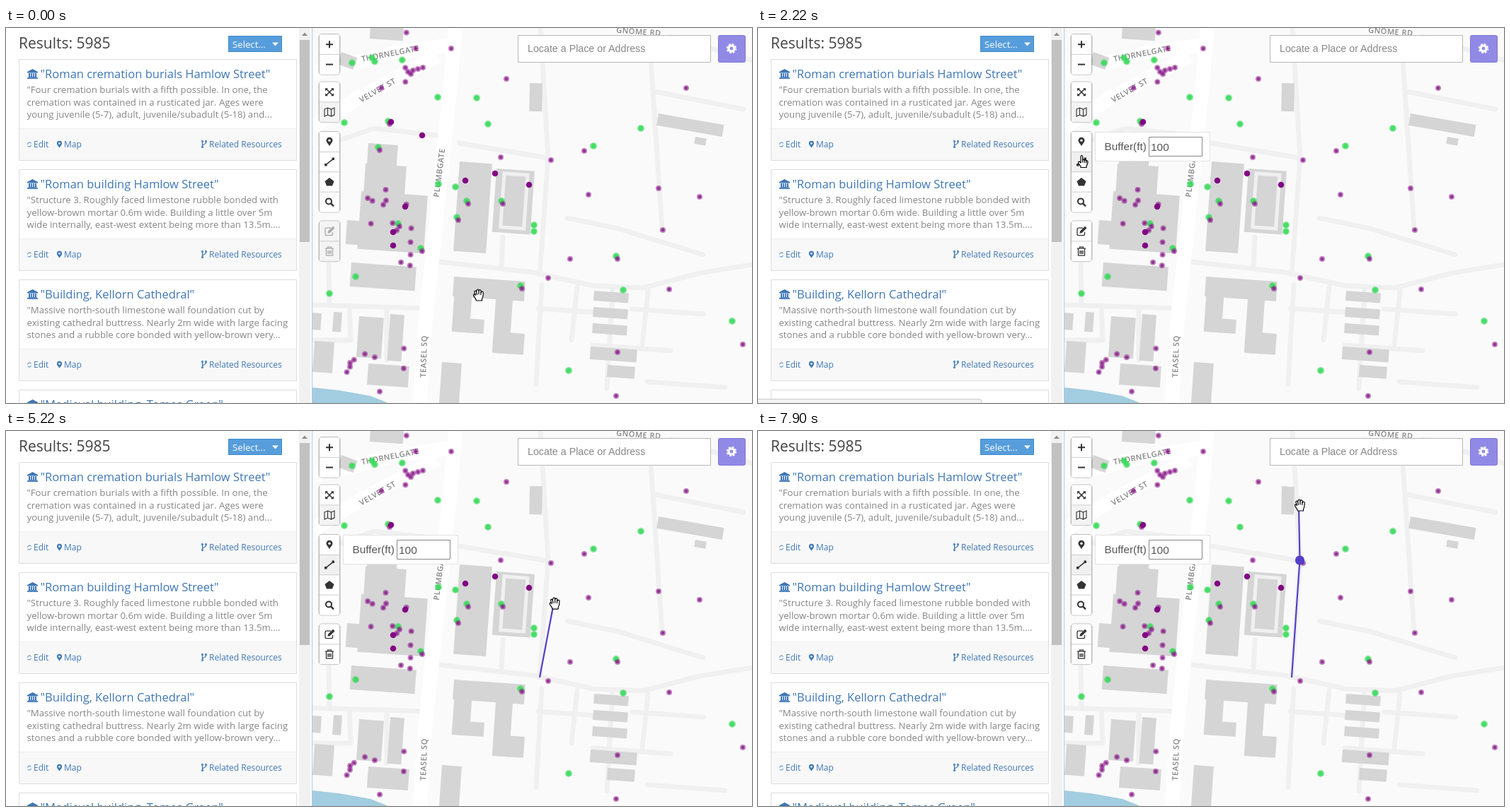
Write an HTML page that moves like this. It is 1054 px wide and 531 px high and loops after 8 s.

```html
<!DOCTYPE html>
<html lang="en">
<head>
<meta charset="utf-8">
<title>Map search</title>
<style>
html, body { margin: 0; width: 100%; height: 100%; overflow: hidden; background: #fff; }
svg { display: block; width: 1054px; height: 531px; font-family: "Open Sans", sans-serif; }
.arial { font-family: "Liberation Sans", Arial, sans-serif; }
.link { fill: #3f77b5; font-size: 12px; }
.title { fill: #3f77b5; font-size: 16.5px; }
.desc { fill: #858585; font-size: 13.2px; }
.street { fill: #858585; font-size: 11px; font-weight: 600; letter-spacing: .5px; text-anchor: middle;
  stroke: #fff; stroke-width: 2.5px; paint-order: stroke; }
.road { fill: none; stroke: #f0f0f0; stroke-width: 7; stroke-linejoin: round; stroke-linecap: round; }
.main { fill: none; stroke: #fff; stroke-width: 20; stroke-linejoin: round; }
.icon { fill: none; stroke: #333; stroke-width: 1.6; }
.solid { fill: #333; stroke: none; }
.hand { fill: #fff; stroke: #000; stroke-width: 1.2; stroke-linejoin: round; stroke-linecap: round; }
</style>
</head>
<body>
<svg viewBox="0 0 1054 531" xmlns="http://www.w3.org/2000/svg">
  <defs>
    <clipPath id="mapClip"><path d="M433 0H1054V531H433Z"/></clipPath>
    <g id="museum" fill="#3f77b5">
      <path d="M0 4 7.5 0 15 4V5.500H0ZM1.500 11H13.500V12H1.500ZM0 12.300H15V14H0Z"/>
      <path d="M2 6H4.200V11H2ZM5.200 6H7V11H5.200ZM8 6H9.800V11H8ZM10.800 6H13V11H10.800Z"/>
    </g>
    <path id="marker" fill-rule="evenodd" d="M0 6C-1 3-4.500 1-4.500-2A4.500 4.500 0 0 1 4.500-2C4.500 1 1 3 0 6ZM0-3.800A1.800 1.800 0 1 0 0-.2 1.800 1.800 0 1 0 0-3.800Z"/>
    <g id="fork" fill="none" stroke="#3f77b5" stroke-width="1.200">
      <path d="M1.500 2V9M6.500 2V3.500C6.500 6 1.500 5 1.500 8"/>
      <circle cx="1.500" cy="1.500" r="1"/><circle cx="6.500" cy="1.500" r="1"/><circle cx="1.500" cy="9.500" r="1"/>
    </g>
    <path id="refresh" fill="none" stroke="#3f77b5" d="M.5 1.500Q1-1 3-1T5.500.5M5.500 3Q5 5 3 5T.5 4"/>
  </defs>

  <g clip-path="url(#mapClip)">
    <path fill="#fafafa" d="M433 0H1054V531H433Z"/>
    <g id="land"></g>
    <g id="dots"></g>
    <g id="sketch" stroke="#5340c8" stroke-width="2.200" fill="none">
      <polyline id="route"/>
      <circle id="vertex" cx="765.500" cy="183" r="5.500" fill="#5340c8"/>
    </g>
  </g>
  <path stroke="#a9c9ee" d="M432.500 0V531"/>

  <g id="panel">
    <text x="18" y="29" font-size="21" fill="#444">Results: 5985</text>
    <path fill="#579ddb" stroke="#3c8bd0" d="M314.500 11.500H389.500V33.500H314.500Z"/>
    <text x="320" y="27.500" font-size="13.200" fill="#fff">Select...</text>
    <path fill="#fff" d="M376 20.500H385L380.500 25.500Z"/>
    <g id="cards"></g>
    <path fill="#f1f1f1" d="M414 0H430V531H414Z"/>
    <path fill="#c1c1c1" d="M415 17H429V303H415Z"/>
    <path fill="#8a8a8a" d="M418 11 422 6.500 426 11Z"/>
    <path id="status" fill="#f2f2f2" stroke="#c8c8c8" d="M-1 525.500H312Q316 525.500 316 529V533H-1Z"/>
  </g>

  <g id="tools"></g>

  <g id="buffer" class="arial" fill="#555">
    <path fill="#fff" stroke="#e3e3e3" d="M476.500 147.500H638.500V188.500H476.500Z"/>
    <text x="489.500" y="173" font-size="15.300">Buffer(ft)</text>
    <path fill="#fff" stroke="#888" d="M552.500 154.500H627.500V181.500H552.500Z"/>
    <text x="555" y="174" font-size="15.500">100</text>
  </g>

  <path fill="#fff" stroke="#b8b8b8" d="M723.500 10.500H995.500V48.500H723.500Z"/>
  <text class="arial" x="737" y="34" font-size="14.250" fill="#888">Locate a Place or Address</text>
  <rect x="1006.500" y="10.500" width="38" height="38" rx="2" fill="#9189e6" stroke="#8078d8"/>
  <g transform="translate(1025 29)" fill="none" stroke="#fff">
    <circle r="4" stroke-width="3.200"/>
    <circle r="6" stroke-width="2.400" stroke-dasharray="2.600 2.112"/>
  </g>

  <g id="cursor" class="hand">
    <g id="open">
      <path d="M-3.500 8C-4 5-6 4-7 1.500-8.500-1-6-2-4.500.5L-6-4C-6.500-6-4-6.500-3.400-4.500L-2.800-6.500C-2.600-8.500-.3-8.500 0-6.500L.3-6C.8-8 3-7.500 3.200-5.500L3.300-3.500C4-5.500 6.500-5 6.300-3 6 0 6.500 3 4.500 5.500V8Z"/>
      <path fill="none" d="M-3.400-4.500-2.500-.5M0-6.500V-1M3.200-4.500 2.800-.5"/>
    </g>
    <g id="closed">
      <path d="M-3.500 6C-4 4-6 3-6 1-6-1-5-1.500-4-1-4.500-4.500-2-5.500-1-4 0-5.500 2-5 2.500-3.800 4-4.800 6-3.500 5.800-1.500 6 1 5.500 2 4 4V6Z"/>
      <path fill="none" d="M-1-4V-2M2.500-3.800V-2M-4-1V1"/>
    </g>
    <g id="point">
      <path d="M-2.800 8.500C-3 5.500-6 4-6.500 1.500-6.500-.5-4.500-.5-3 2V-7C-3-9-.4-9-.4-7V-2C.3-3.500 2-3 2.200-1.500 3-2.800 4.600-2 4.700-.8 5.500-1.800 7-1 7 .5 7 3.500 6 5 5 6.500V8.500Z"/>
      <path fill="none" d="M-.4-2V1M2.200-1.500V1.500M4.700-.8V2"/>
    </g>
  </g>
</svg>

<script>
const $ = id => document.getElementById(id);
const fill = (id, html) => $(id).innerHTML = html;
const text = (cls, x, y, s) => `<text class="${cls}" x="${x}" y="${y}">${s}</text>`;
const repeat = (n, make) => Array.from({ length: n }, (_, i) => make(i));

// Result cards
const results = [
  ['Roman cremation burials Hamlow Street', '"Four cremation burials with a fifth possible. In one, the',
    'cremation was contained in a rusticated jar. Ages were', 'young juvenile (5-7), adult, juvenile/subadult (5-18) and...'],
  ['Roman building Hamlow Street', '"Structure 3. Roughly faced limestone rubble bonded with',
    'yellow-brown mortar 0.6m wide. Building a little over 5m', 'wide internally, east-west extent being more than 13.5m....'],
  ['Building, Kellorn Cathedral', '"Massive north-south limestone wall foundation cut by',
    'existing cathedral buttress. Nearly 2m wide with large facing', 'stones and a rubble core bonded with yellow-brown very...'],
  ['Medieval building, Tomes Green']
];
fill('cards', results.map(([title, ...lines], i) => `<g transform="translate(0 ${i * 156})">
  <path fill="#fff" stroke="#ddd" d="M18.500 44.500H410.500V187.500H18.500Z"/>
  <path fill="#f8f8f8" d="M19 142H410V187H19Z"/><path stroke="#eee" d="M19 142.500H410"/>
  <use href="#museum" x="30" y="58"/>
  ${text('title', 48.5, 71, `"${title}"`)}
  ${lines.map((line, n) => text('desc', 29.5, 92 + n * 17.5, line)).join('')}
  <use href="#refresh" x="30" y="163"/>${text('link', 39, 169, 'Edit')}
  <use href="#marker" fill="#3f77b5" transform="translate(75.500 165) scale(.8)"/>${text('link', 82, 169, 'Map')}
  <use href="#fork" x="276" y="159"/>${text('link', 287, 169, 'Related Resources')}
</g>`).join(''));

// Map base: the town sits on a slightly turned grid
const block = (x, y, w, h, turn = 4) =>
  `<rect x="${x}" y="${y}" width="${w}" height="${h}" transform="rotate(${turn} ${x} ${y})"/>`;
const street = (x, y, turn, name) =>
  `<text class="street" transform="translate(${x} ${y}) rotate(${turn})" y="4">${name}</text>`;
const buildings = [
  block(515, -3, 47, 18), block(474, 34, 24, 18, 20), block(740, 78, 18, 40, 1),
  block(922, 121, 94, 17, 10), block(974, 154, 16, 10, 10),
  block(512, 163, 42, 70), block(508, 192, 58, 40), block(502, 231, 94, 82), block(482, 272, 60, 34), block(488, 332, 92, 34),
  block(641, 189, 46, 127), block(693, 199, 54, 90),
  block(633, 352, 101, 28), block(635, 354, 25, 76), block(634, 410, 42, 20), block(693, 370, 24, 90), block(691, 430, 42, 30),
  ...repeat(3, i => block(831 - i, 372 + i * 23, 49, 14)), block(826, 451, 66, 18), block(850, 477, 39, 17),
  block(616, 473, 28, 60), block(499, 408, 35, 58), block(543, 405, 20, 66), block(512, 475, 58, 30),
  block(463, 402, 12, 28), block(433, 403, 13, 24), block(436, 443, 28, 44)
];
const lanes = repeat(4, i => `M${757 + i * 50} ${364 + i * 3}l-8 ${i % 2 ? 75 : 140}`).join('')
  + repeat(3, i => `M${752 + i * 77} ${397 + i * 52}l110 8`).join('');
fill('land', `<path class="road" d="M612 331 745 346 830 365 900 368 980 347 1054 335M755 0 766 183 754 349M640 163 766 184
    M793 269 865 284 985 321M910 30 927 285M940 12 1054 46M917 90 1042 115M885 398 985 405
    M433 392 592 397M485 396 487 442 433 442M538 397 538 470M456 335 457 392M702 296 700 335M474 158 520 142 608 152${lanes}"/>
  <path class="main" d="M433 64 545 36 642 22M433 140 500 98 610 40"/>
  <g fill="#d5d5d5">${buildings.join('')}</g>
  <g fill="none" stroke="#f0f0f0" stroke-width="5">${block(704, 206, 33, 76)}</g>
  <path class="main" d="M635 0 627 90 605 300 592 420 585 531"/>
  <path fill="#a3cde0" d="M433 509 470 513 515 521 540 531H433Z"/>`
  + street(543, 36, -11, 'THORNELGATE') + street(525, 88, -30, 'VELVET ST') + street(612, 205, -83, 'PLUMBGATE')
  + street(590, 465, -88, 'TEASEL SQ') + street(894, 5, 4, 'GNOME RD'));

// Find spots: landmarks by place, the crowded old town by seeded scatter
let seed = 7;
const random = () => (seed = seed * 16807 % 2147483647) / 2147483647;
const scatter = (n, x, y, w, h) => repeat(n, () => [x + random() * w, y + random() * h]);
const places = list => list.split(' ').map(p => p.split(',').map(Number));
const spots = (list, color, outer, inner, alpha) => list.map(([x, y]) => `<g fill="${color}">
  <circle cx="${x}" cy="${y}" r="${outer}" opacity="${alpha}"/><circle cx="${x}" cy="${y}" r="${inner}" opacity=".8"/></g>`).join('');

const mixed = places('701,247 652,247 638,270 728,367 863,325 527,171 541,134 555,279 587,314');
const green = places('610,98 665,99 681,136 478,134 830,167 897,142 611,221 635,225 746,279 746,288 494,352 457,376 872,371 1026,415 795,485');
const purple = places('629,29 707,72 961,85 770,187 817,174 823,236 922,227 980,239 928,286 797,327 766,354 937,370 864,459 862,521 1041,448 699,183');
const dark = places('544,133 588,152 691,206 649,216 739,222 564,253 547,289 547,308');
fill('dots',
  spots([...green, ...mixed.map(([x, y]) => [x - 1, y - 2]), ...scatter(4, 489, 40, 97, 10)], '#35d958', 5, 3.5, .55)
  + spots([...purple, ...mixed.map(([x, y]) => [x + 1, y + 2]), ...repeat(4, i => [568 + i * 7, 62 - i * 2]),
    ...scatter(6, 489, 0, 110, 120), ...scatter(14, 507, 200, 70, 150), ...scatter(9, 435, 450, 140, 70)], '#8b1a8b', 4, 2.2, .55)
  + spots(dark, '#800080', 4.3, 3.5, .9));

// Map toolbar: icons are centred on their button
const icons = {
  plus: '<path stroke-width="2" d="M-5 0H5M0-5V5"/>',
  minus: '<path stroke-width="2" d="M-5 0H5"/>',
  expand: '<path d="M-4-4 4 4M4-4-4 4"/><path class="solid" d="M-6-5.500H-2L-6-1.500ZM6-5.500H2L6-1.500ZM-6 5.500H-2L-6 1.500ZM6 5.500H2L6 1.500Z"/>',
  map: '<path stroke-width="1.100" d="M-7-4-2.500-6 2.500-4 7-6V4L2.500 6-2.500 4-7 6ZM-2.500-6V4M2.500-4V6"/>',
  pin: '<use href="#marker" class="solid"/>',
  line: '<path d="M-5 4 5-4"/><path class="solid" d="M-7 2.500H-3.500V6H-7ZM3.500-6H7V-2.500H3.500Z"/>',
  shape: '<path class="solid" d="M0-6 6.500-1 4 5.500H-4L-6.500-1Z"/>',
  find: '<circle cx="-1" cy="-1" r="4" stroke-width="2"/><path stroke-width="2.400" d="M2 2 6 6"/>',
  edit: '<path stroke-width="1.300" d="M2-4.500H-4Q-6-4.500-6-2.500V4Q-6 6-4 6H2.500Q4.500 6 4.500 4V1"/><path class="solid" d="M-2.500 3-2 0 5-7 7.500-4.500.5 2.500Z"/>',
  trash: '<path stroke-width="1.300" d="M-6-4H6M-2.500-4V-6H2.500V-4M-4.500-4V6H4.500V-4M-2-1V4M0-1V4M2-1V4"/>'
};
const group = (top, ...names) => {
  const h = names.length * 28.4;
  return `<rect x="441.500" y="${top - 1}" width="31" height="${h + 2}" rx="5" fill="#000" opacity=".25"/>
    <rect x="443" y="${top}" width="28" height="${h}" rx="3" fill="#fff"/>` + names.map((name, i) =>
    `<g id="${name}" class="icon" transform="translate(457 ${top + 14.2 + i * 28.4})">
      <rect class="back" x="-14" y="-14" width="28" height="28" rx="2" stroke="none" fill="${name == 'map' ? '#f4f4f4' : '#fff'}"/>
      ${i ? '<path stroke="#ccc" stroke-width="1" d="M-14-14.200H14"/>' : ''}<g class="mark">${icons[name]}</g></g>`).join('');
};
fill('tools', group(9, 'plus', 'minus') + group(76.5, 'expand', 'map')
  + group(147, 'pin', 'line', 'shape', 'find') + group(273.5, 'edit', 'trash'));

// Pointer stops: time, x, y
const stops = [
  [0, 668, 378], [760, 668, 378], [1490, 459, 189], [3070, 459, 189], [3450, 528, 216], [4400, 757, 352], [4780, 757, 352],
  [5500, 785, 190], [5600, 768, 185], [6050, 768, 181], [6720, 760, 77], [7150, 768, 102], [7900, 766, 105], [8000, 766, 105]
];
const clamp = v => Math.max(0, Math.min(1, v));
const ease = k => k * k * (3 - 2 * k);
const pointerAt = t => {
  const i = stops.findIndex(s => s[0] > t);
  const [a, b] = [stops[i - 1], stops[i]];
  const k = ease((t - a[0]) / (b[0] - a[0]));
  return [a[1] + (b[1] - a[1]) * k, a[2] + (b[2] - a[2]) * k];
};
const show = (id, on) => $(id).style.display = on ? '' : 'none';
const back = (id, color) => $(id).querySelector('.back').setAttribute('fill', color);

const draw = t => {
  const [x, y] = pointerAt(t);
  const active = t >= 2000, onButton = x < 472;
  const closed = t >= 4400 && t < 4690;
  $('cursor').setAttribute('transform', `translate(${x} ${y})`);
  show('point', onButton);
  show('closed', closed);
  show('open', !onButton && !closed);

  show('buffer', active);
  back('line', active || onButton ? '#f0f0f0' : '#fff');
  for (const id of ['edit', 'trash']) {
    back(id, active ? '#fff' : '#f4f4f4');
    $(id).querySelector('.mark').style.opacity = active ? 1 : .38;
  }
  $('status').style.opacity = clamp((t - 1600) / 160) * clamp((3800 - t) / 200);

  const turned = t >= 6100;
  show('sketch', t >= 4690);
  show('vertex', turned);
  $('route').setAttribute('points', `754,349 ${turned ? '765.5,183' : ''} ${x - 2},${y + 1}`);
};

const loop = now => {
  draw(now % 8000);
  requestAnimationFrame(loop);
};
draw(0);
requestAnimationFrame(loop);
</script>
</body>
</html>
```
